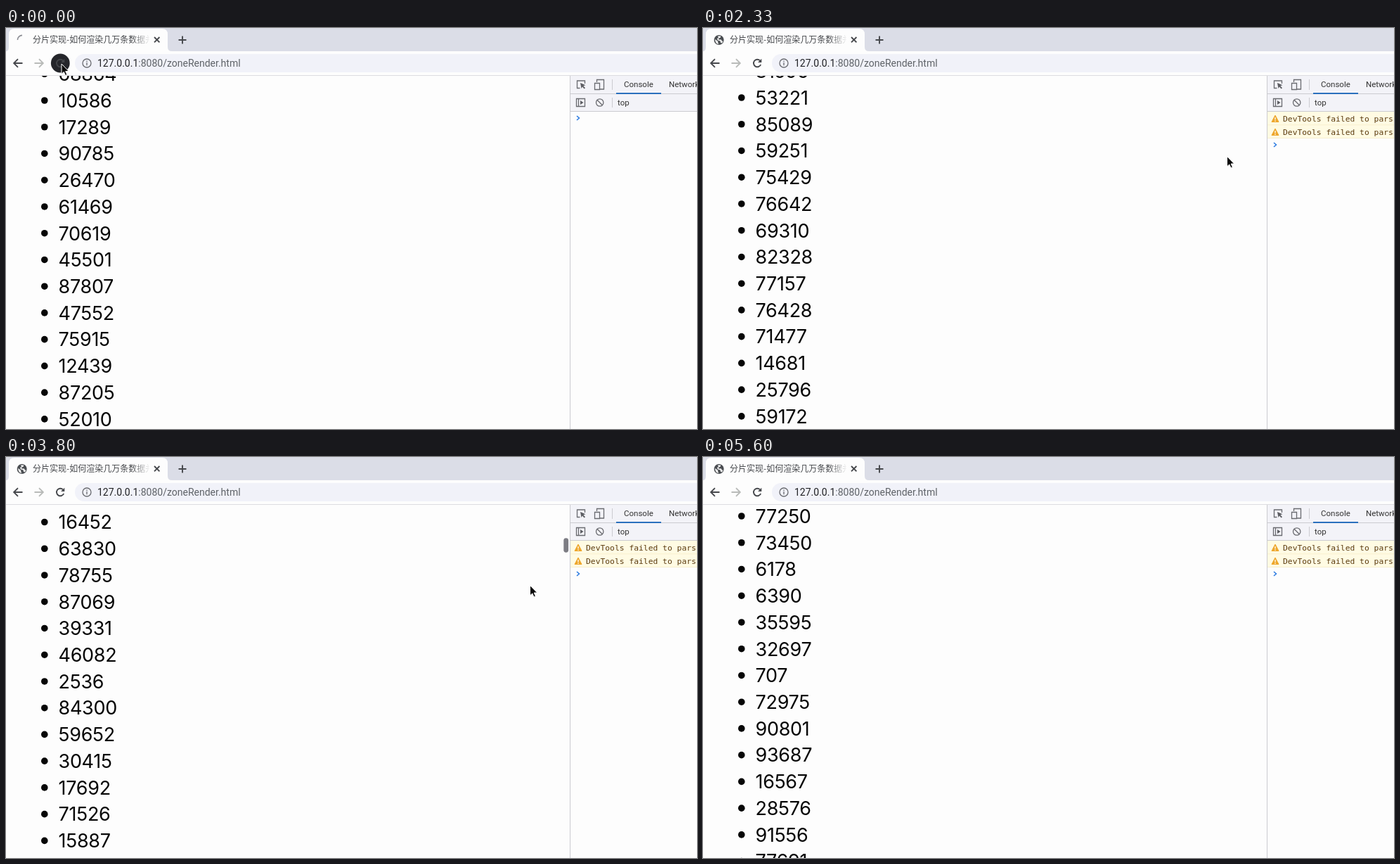
Write an HTML page that moves like this. It is 983 by 570 pixels and loops after 5.67 s.

```html
<!DOCTYPE html>
<html lang="zh">
<head>
<meta charset="utf-8">
<title>zoneRender</title>
<style>
  html, body { margin: 0; width: 100%; height: 100%; overflow: hidden; background: #fdfdfd; }
  svg { display: block; }
  text { white-space: pre; }
  .row { font: 27px Inter, "Liberation Sans", sans-serif; letter-spacing: -.3px; fill: #060606; }
  .title { font: 12px "Noto Sans CJK SC", "Noto Sans CJK", sans-serif; fill: #45474b; }
  .url { font: 14px Roboto, sans-serif; fill: #5f6368; }
  .tool { font: 11.5px Roboto, sans-serif; fill: #333; }
  .log { font: 11.34px "DejaVu Sans Mono", monospace; fill: #5c3c10; }
  .line { fill: none; stroke: #6a6b70; stroke-width: 1.3; }
  .nav { fill: none; stroke: #46484c; stroke-width: 1.9; }
</style>
</head>
<body>
<svg width="983" height="570" viewBox="0 0 983 570">
  <defs>
    <linearGradient id="fade">
      <stop offset="0" stop-color="#fdfdfd" stop-opacity="0"/>
      <stop offset="1" stop-color="#fdfdfd"/>
    </linearGradient>
    <g id="warning">
      <path d="M0-5 5 4.5H-5Z" fill="#eea72c" stroke="#eea72c" stroke-linejoin="round"/>
      <path d="M0-2V1.5M0 2.6V4" stroke="#fff" stroke-width="1.3"/>
    </g>
  </defs>

  <rect width="983" height="570" fill="#fdfdfd"/>
  <g id="list"></g>
  <rect id="thumb" x="793.3" width="6.8" rx="3.4" fill="#7d7d84"/>

  <!-- Browser chrome -->
  <rect width="983" height="33" fill="#dbdde7"/>
  <path d="M0 33Q4 33 4 27V9Q4 1 12 1H222Q230 1 230 9V27Q230 33 236 33Z" fill="#fdfdfd"/>
  <rect y="33" width="983" height="35" fill="#fdfdfd"/>
  <path d="M983 37H111a13 13 0 0 0 0 26H983Z" fill="#f1f2f9"/>
  <path d="M0 67.5H983" stroke="#dcdce0"/>
  <g id="globe">
    <circle cx="22.7" cy="17" r="7" fill="#4a4d51"/>
    <path d="M17.3 16l4 3v2.2l1.2 1.6c-3 .2-5.6-3-5.2-6.8ZM21 11.6h4.2l-.4 2.2-2.3.8-.4 1.8h3.8l1.2 2.4 1.4-.2c-.3 1.3-.9 2.2-1.6 2.9l-2-.7-.3-2.2-3.6-1.1-1-2.4 2-1.2Z" fill="#f7f7f7"/>
  </g>
  <path id="spinner" d="M16.4 17A6.6 6.6 0 0 1 23 10.4" fill="none" stroke="#8b8d94" stroke-width="1.6"/>
  <text class="title" x="38" y="21.3">分片实现-如何渲染几万条数据并</text>
  <rect x="178" y="5" width="27" height="24" fill="url(#fade)"/>
  <rect x="204" y="5" width="8" height="24" fill="#fdfdfd"/>
  <path d="M211 13l7.4 7.4M218.4 13l-7.4 7.4M245.5 17h11M251 11.5v11" class="nav" stroke-width="1.7"/>

  <path class="nav" d="M23.5 50H11.5M17 44.2L11.2 50 17 55.8"/>
  <path class="nav" d="M40.5 50H52.5M47 44.2L52.8 50 47 55.8" style="stroke:#b9bbb9"/>
  <circle id="press" cx="77.3" cy="50" r="13.4" fill="#25262b"/>
  <g id="reload" fill="none" stroke="#46484c" stroke-width="1.9">
    <path d="M82.2 52A5.3 5.3 0 1 1 81 46.2"/>
    <path d="M83.3 43.8V49H78.1Z" fill="#46484c" stroke="none"/>
  </g>
  <circle cx="115" cy="50" r="6" class="line" stroke-width="1.5"/>
  <path d="M115 49v4.3M115 46.4v1.6" class="line" stroke-width="1.5"/>
  <text class="url" x="130" y="55"><tspan fill="#202124">127.0.0.1</tspan>:8080/zoneRender.html</text>

  <!-- Developer panel -->
  <rect x="802" y="68" width="181" height="502" fill="#fdfdfd"/>
  <rect x="802" y="68" width="181" height="51" fill="#f3f3f8"/>
  <path d="M802.5 68V570M802 93.5H983M802 118.5H983M862.5 73V88M862.5 99V113" stroke="#cbcbd0"/>
  <rect x="868" y="92" width="64" height="2" fill="#2b70bd"/>
  <path class="line" d="M823.5 79V75H812.5V85.5H816.5M840.5 77V73.5H850.5V87H845M837.5 78.5H844.5V87.5H837.5ZM811.5 100.5H823.5V111.5H811.5ZM814.5 100.5V111.5"/>
  <path d="M817 78l7.4 3.2-3 1.1 2.6 3-1.4 1.2-2.6-3-1.5 2.6ZM817 103l4.5 3-4.5 3Z" fill="#5c5d62"/>
  <circle class="line" cx="844.7" cy="106" r="5.2" stroke-width="1.6"/>
  <path class="line" d="M841 102.3l7.4 7.4" stroke-width="1.6"/>
  <text class="tool" x="879" y="84">Console</text>
  <text class="tool" x="943" y="84">Network</text>
  <text class="tool" x="870" y="109.5">top</text>
  <g id="warnings">
    <rect x="803" y="119" width="180" height="37.5" fill="#fffbe3"/>
    <path d="M803 137.8H983M803 156.5H983" stroke="#f8efcf"/>
    <use href="#warning" x="814" y="129"/>
    <use href="#warning" x="814" y="148"/>
    <text class="log" x="825" y="133">DevTools failed to pars</text>
    <text class="log" x="825" y="152">DevTools failed to pars</text>
  </g>
  <path id="prompt" d="M812-3l3.4 3-3.4 3" fill="none" stroke="#2f7de1" stroke-width="1.6"/>

  <path id="cursor" d="M0 0V14.4L3.3 11.4 5.5 16.4 7.9 15.4 5.7 10.5H10.2Z" fill="#080808" stroke="#fff" stroke-width="1"/>
</svg>

<script>
const LOOP = 5670, FRAMES = 85, STEP = 200 / 3;
const PITCH = 37.74, FIRST_Y = 117, VIEW_TOP = 68;
const OLD_LIST = 900, LOADED = 600;
const el = id => document.getElementById(id);
const scrollFor = (row, y) => FIRST_Y + row * PITCH - y;

// Known runs of the list, keyed by the index of their first row.
const runs = {
  22: "81596 53221 85089 59251 75429 76642 69310 82328 77157 76428 71477 14681 25796 59172",
  280: "82786 14056 52944 78233 52901 54696 97516 17079 97478 36609 87953 95461 59821 20868",
  347: "16452 63830 78755 87069 39331 46082 2536 84300 59652 30415 17692 71526 15887",
  370: "77250 73450 6178 6390 35595 32697 707 72975 90801 93687 16567 28576 91556 77691",
  [OLD_LIST - 1]: "68864 10586 17289 90785 26470 61469 70619 45501 87807 47552 75915 12439 87205 52010"
};
const known = {};
for (const [start, run] of Object.entries(runs))
  run.split(" ").forEach((value, k) => known[+start + k] = value);

function rowValue(i) {
  const s = Math.sin(i * 12.9898 + 4.1) * 43758.5453;
  return known[i] ?? String(Math.floor((s - Math.floor(s)) * 1e5));
}

// Smooth monotone curve through [time, value] points, held at both ends.
function track(points) {
  const slope = k => (points[k + 1][1] - points[k][1]) / (points[k + 1][0] - points[k][0]);
  const tangents = points.map((_, k) => {
    if (!k || k === points.length - 1) return 0;
    const a = slope(k - 1), b = slope(k);
    return a * b <= 0 ? 0 : 2 * a * b / (a + b);
  });
  return t => {
    if (t <= points[0][0]) return points[0][1];
    const k = points.findIndex(p => p[0] >= t) - 1;
    if (k < 0) return points[points.length - 1][1];
    const [t0, v0] = points[k], [t1, v1] = points[k + 1];
    const d = t1 - t0, u = (t - t0) / d, w = 1 - u;
    return v0 * (1 + 2 * u) * w * w + v1 * u * u * (3 - 2 * u)
      + d * u * w * (tangents[k] * w - tangents[k + 1] * u);
  };
}

const scrollAt = track([[870, 0], [1400, scrollFor(23, 99)], [2400, scrollFor(23, 99)],
  [3330, scrollFor(280, 87)], [3800, scrollFor(347, 92.5)], [4200, scrollFor(370, 84)]]);
const cursorX = track([[200, 79], [870, 743.7], [1470, 743.7], [2070, 745.5],
  [3870, 745.5], [4200, 743.7], [5070, 743.7], [5500, 760]]);
const cursorY = track([[200, 51], [870, 197.5], [1470, 197.5], [2070, 182.5],
  [3870, 182.5], [4200, 175], [5070, 175], [5500, -25]]);
const thumbAlpha = track([[860, 0], [930, 1], [1740, 1], [2000, 0],
  [2390, 0], [2460, 1], [4530, 1], [4800, 0]]);
const earlyThumb = track([[870, 68], [1400, 153]]);
const earlyHeight = track([[870, 90], [1400, 52]]);

const rows = Array.from({ length: 16 }, () => {
  const g = document.createElementNS("http://www.w3.org/2000/svg", "g");
  g.innerHTML = '<circle cx="54.8" r="4.8" fill="#060606"/><text class="row" x="74.5" y="9.8"></text>';
  el("list").append(g);
  return g;
});

const show = (id, on) => el(id).setAttribute("visibility", on ? "visible" : "hidden");
const move = (node, x, y) => node.setAttribute("transform", `translate(${x} ${y})`);

function drawList(scroll) {
  const first = Math.ceil((scroll + VIEW_TOP - 20 - FIRST_Y) / PITCH);
  rows.forEach((g, k) => {
    const i = first + k;
    g.setAttribute("visibility", i < 0 ? "hidden" : "visible");
    move(g, 0, FIRST_Y + i * PITCH - scroll);
    g.lastChild.textContent = rowValue(i);
  });
}

function drawThumb(t, scroll) {
  const early = t < 2200;
  el("thumb").setAttribute("y", early ? earlyThumb(t) : VIEW_TOP + scroll * 482 / 134000);
  el("thumb").setAttribute("height", early ? earlyHeight(t) : 20.5);
  el("thumb").setAttribute("opacity", thumbAlpha(t));
}

function draw(t) {
  const scroll = t < 70 ? scrollFor(OLD_LIST, 103) : scrollAt(t);
  const loaded = t >= LOADED, hovering = t < 270;
  drawList(scroll);
  drawThumb(t, scroll);
  show("globe", loaded);
  show("spinner", !loaded);
  show("warnings", loaded);
  show("press", hovering);
  el("reload").setAttribute("opacity", hovering ? 0.9 : 1);
  el("spinner").setAttribute("transform", `rotate(${t * 0.36} 23 17)`);
  move(el("prompt"), 0, loaded ? 166 : 128);
  move(el("cursor"), cursorX(t), cursorY(t));
}

const origin = performance.now();
function tick() {
  const t = Math.max(0, performance.now() - origin) % LOOP;
  const frame = Math.min(FRAMES - 1, Math.floor((t + 4) / STEP));
  draw(Math.round(frame * STEP / 10) * 10);
  requestAnimationFrame(tick);
}
tick();
</script>
</body>
</html>
```
